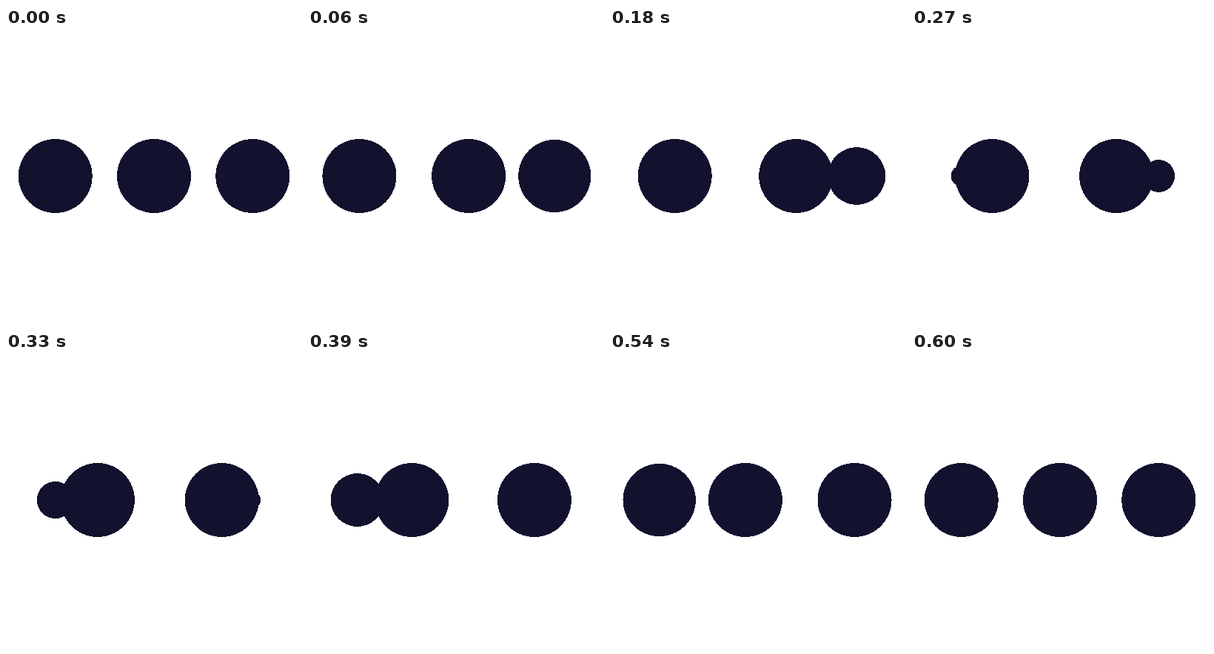
An HTML page for the animation above (630 ms loop, 400 by 400 pixels).

```html
<!DOCTYPE html>
<html lang="en">
<head>
<meta charset="utf-8">
<title>Loading dots</title>
<style>
  html, body { margin: 0; height: 100%; overflow: hidden; background: #fff; }
  svg { display: block; width: 100vw; height: 100vh; fill: #12122f; }
</style>
</head>
<body>
<svg viewBox="0 0 400 400" shape-rendering="crispEdges">
  <circle cx="66.67" cy="200"/>
  <circle cy="200" r="50"/>
  <circle cy="200" r="50"/>
  <circle cx="333.33" cy="200"/>
</svg>
<script>
  const STEP = 30, STEPS = 21, RADIUS = 50, GAP = 400 / 3, LEFT = GAP / 2, CENTER = 200;
  const [growing, first, second, shrinking] = document.querySelectorAll('circle');

  // Symmetric cubic-bezier(a, 0, 1 - a, 1)
  function ease(x, a = 0.53) {
    if (x <= 0) return 0;
    if (x >= 1) return 1;
    let low = 0, high = 1, s;
    for (let i = 0; i < 24; i++) {
      s = (low + high) / 2;
      const q = 1 - s;
      const at = 3 * a * s * q * q + 3 * (1 - a) * s * s * q + s * s * s;
      if (at < x) low = s; else high = s;
    }
    return s * s * (3 - 2 * s);
  }

  // Starts at rest, then settles to a constant speed
  const accelerate = u => (9 * u - 2 * (1 - (1 - u) ** 4.5)) / 7;

  function draw() {
    const u = Math.floor(performance.now() / STEP) % STEPS / (STEPS - 1);
    growing.setAttribute('r', RADIUS * ease((u - 0.1) / 0.9));
    first.setAttribute('cx', LEFT + GAP * accelerate(u));
    second.setAttribute('cx', CENTER + GAP * (1 - accelerate(1 - u)));
    shrinking.setAttribute('r', RADIUS * (1 - ease(u / 0.85)));
    requestAnimationFrame(draw);
  }
  draw();
</script>
</body>
</html>
```
